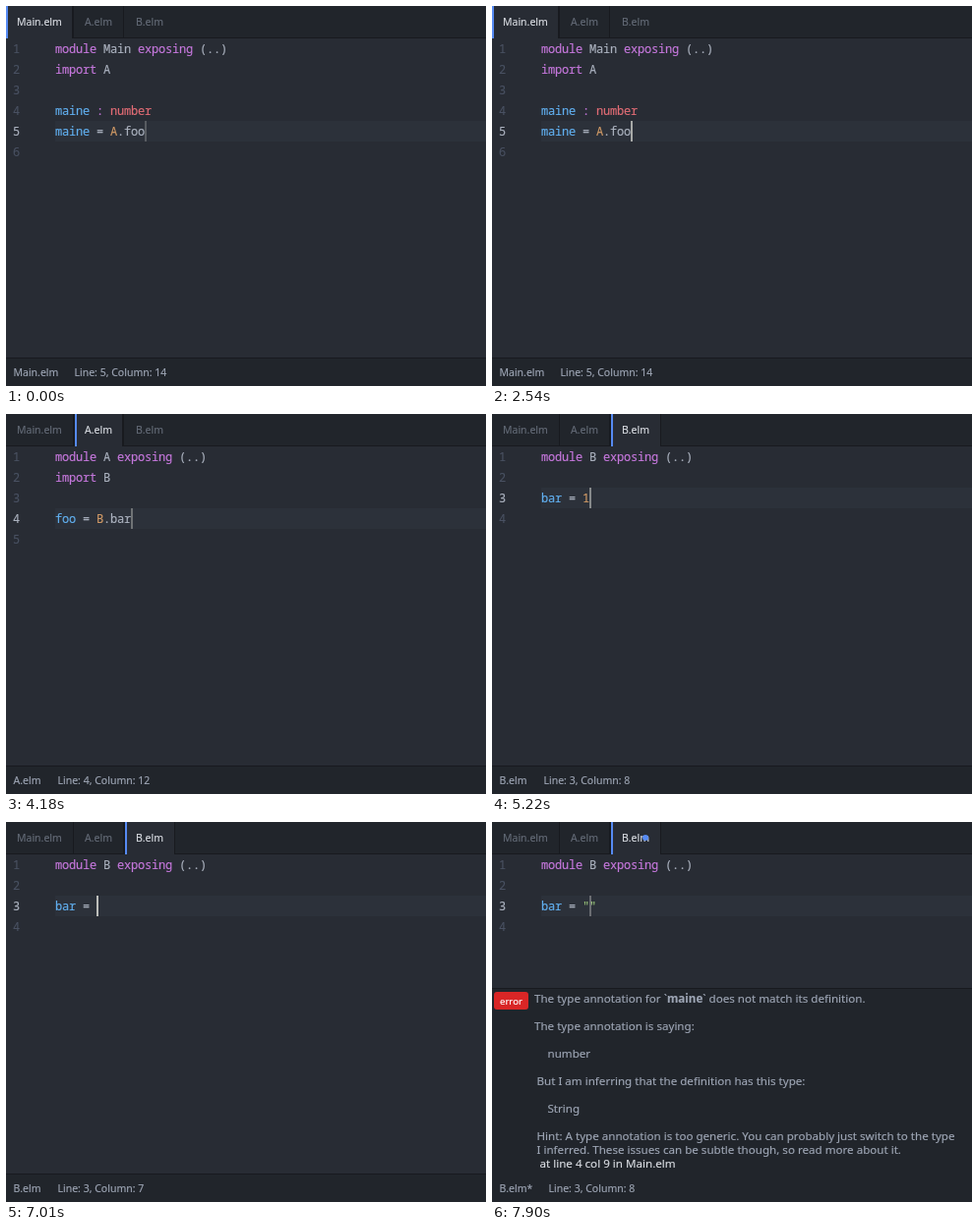
An HTML page that plays this animation: 488x387 px, repeating every 8000 ms.

```html
<!DOCTYPE html>
<html lang="en">
<head>
<meta charset="utf-8">
<title>Editor</title>
<style>
  html, body { margin: 0; width: 100%; height: 100%; overflow: hidden; background: #282c34; }
  svg { display: block; width: 488px; height: 387px; }
  text {
    white-space: pre; fill: currentColor; stroke: currentColor; stroke-width: .15px;
    font: 10.5px "Noto Sans", "Open Sans", sans-serif;
  }
  .code { font: 12px "Noto Sans Mono", "DejaVu Sans Mono", monospace; letter-spacing: -.2px; }
  .report { font-size: 11.6px; }
  .badge { font-size: 9.6px; }
</style>
</head>
<body>
<svg id="stage" viewBox="0 0 488 387"></svg>
<script>
const LOOP = 8000, SAMPLE = 149.4, BLINK = 800;
const ROW = 21, TOP = 33, LEFT = 50, CHAR = 7;
const EDGE = '#181a1f', BAR = '#21252b', PAGE = '#282c34', BLUE = '#568af2';
const SOFT = '#9da5b4', BRIGHT = '#d7dae0', FAINT = '#636a76';
const INK = { p: '#abb2bf', k: '#c678dd', b: '#61afef', r: '#e06c75', o: '#d19a66', s: '#98c379' };

const TABS = [
  { name: 'Main.elm', x: 0, end: 67, textX: 11 },
  { name: 'A.elm', x: 70, end: 118, textX: 80 },
  { name: 'B.elm', x: 121, end: 171, textX: 132 }
];

// Each token is an ink letter, a colon and the text.
const header = name => ['k:module', `p: ${name} `, 'k:exposing', 'p: (..)'];
const imports = name => ['k:import', `p: ${name}`];
const mainCode = [header('Main'), imports('A'), [],
  ['b:maine', 'p: ', 'k::', 'p: ', 'r:number'],
  ['b:maine', 'p: = ', 'o:A', 'p:.foo'], []];
const aCode = [header('A'), imports('B'), [], ['b:foo', 'p: = ', 'o:B', 'p:.bar'], []];
const bCode = value => [header('B'), [], ['b:bar', 'p: = ', ...value], []];

// peak: a moment of full cursor brightness; hold: stay bright until then.
const SCENES = [
  { at: 0, tab: 0, code: mainCode, line: 5, col: 14, peak: 325, lineX: 69.5 },
  { at: 3740, tab: 1, code: aCode, line: 4, col: 12, peak: 3905, lineX: 52.5 },
  { at: 4930, tab: 2, code: bCode(['o:1']), line: 3, col: 8, peak: 4985, lineX: 52.5 },
  { at: 6560, tab: 2, code: bCode([]), line: 3, col: 7, peak: 6860, hold: true, lineX: 52.5 },
  { at: 7305, tab: 2, code: bCode(['s:""']), line: 3, col: 8, peak: 7610, hold: true, lineX: 52.5 }
];
const STAR_AT = 7450, DOT_AT = 7600, REPORT_AT = 7750;

const REPORT = [
  [43, 184, 'The type annotation for `<tspan font-weight="700">maine</tspan>` does not match its definition.'],
  [43, 212, 'The type annotation is saying:'],
  [56.5, 240, 'number'],
  [45.5, 268, 'But I am inferring that the definition has this type:'],
  [56.5, 296, 'String'],
  [45.5, 324, 'Hint: A type annotation is too generic. You can probably just switch to the type'],
  [45.5, 338, 'I inferred. These issues can be subtle though, so read more about it.'],
  [48.5, 352, 'at line 4 col 9 in Main.elm', BRIGHT]
];

const rect = (x, y, w, h, fill, more = '') =>
  `<rect x="${x}" y="${y}" width="${w}" height="${h}" fill="${fill}" ${more}/>`;
const text = (x, y, body, color = SOFT, kind = '') =>
  `<text x="${x}" y="${y}" color="${color}" class="${kind}">${body}</text>`;

function drawTabs(active, dirty) {
  let out = rect(0, 0, 488, TOP, BAR) + rect(0, 32, 488, 1, EDGE);
  for (const x of [68, 119]) out += rect(x, 0, 1, TOP, EDGE);
  TABS.forEach((tab, i) => {
    const on = i === active;
    if (on) {
      out += rect(tab.x - 1, 0, tab.end - tab.x + 2, TOP, EDGE)
        + rect(tab.x, 0, tab.end - tab.x, TOP, PAGE) + rect(tab.x, 0, 2, TOP, BLUE);
    }
    out += text(tab.textX, 20, tab.name, on ? BRIGHT : FAINT);
  });
  return out + (dirty ? `<circle cx="156" cy="16" r="3" fill="${BLUE}"/>` : '');
}

function drawCode({ code, line }) {
  let out = rect(LEFT, TOP + (line - 1) * ROW, 488 - LEFT, ROW, '#2c313a');
  code.forEach((tokens, i) => {
    const y = TOP + i * ROW + 15;
    out += text(7, y, i + 1, i + 1 === line ? INK.p : '#495162', 'code');
    let column = 0;
    for (const token of tokens) {
      const body = token.slice(2), lead = body.length - body.trimStart().length;
      out += text(LEFT + (column + lead) * CHAR, y, body.trim(), INK[token[0]], 'code');
      column += body.length;
    }
  });
  return out;
}

function drawReport() {
  return rect(0, 169, 488, 190, BAR) + rect(0, 169, 488, 1, EDGE)
    + rect(2, 173, 35, 18, '#d92626', 'rx="3"') + text(8, 185.5, 'error', '#fff', 'badge')
    + REPORT.map(([x, y, body, color]) => text(x, y, body, color, 'report')).join('');
}

function drawStatus({ tab, line, col, lineX }, starred) {
  return rect(0, 358, 488, 29, BAR) + rect(0, 358, 488, 1, EDGE)
    + text(7.5, 377, TABS[tab].name + (starred ? '*' : ''))
    + text(lineX + (starred ? 5 : 0), 377, `Line: ${line}, Column: ${col}`);
}

function cursorAlpha({ at, peak, hold }, time) {
  // The small lead absorbs the rounding of sample times.
  const sampled = at + Math.floor((time - at) / SAMPLE + .07) * SAMPLE;
  if (hold && sampled < peak) return 1;
  const phase = Math.abs(sampled - peak) % BLINK;
  const level = 1 - Math.min(phase, BLINK - phase) / (BLINK / 2);
  return Math.min(1, level * 1.12);
}

const stage = document.getElementById('stage');
stage.innerHTML = '<g></g>' + rect(0, 0, 2, ROW, '#f8f8f0') + '<g></g>';
const [view, cursor, panels] = stage.children;
let shown = '';

function render(time) {
  const scene = SCENES.findLast(s => s.at <= time);
  const starred = time >= STAR_AT, dirty = time >= DOT_AT, report = time >= REPORT_AT;
  const state = [scene.at, starred, dirty, report].join();
  if (state !== shown) {
    shown = state;
    view.innerHTML = rect(0, 0, 488, 387, PAGE) + drawTabs(scene.tab, dirty) + drawCode(scene);
    panels.innerHTML = drawStatus(scene, starred) + (report ? drawReport() : '');
    cursor.setAttribute('x', LEFT + (scene.col - 1) * CHAR);
    cursor.setAttribute('y', TOP + (scene.line - 1) * ROW);
  }
  cursor.setAttribute('opacity', cursorAlpha(scene, time).toFixed(3));
}

const start = performance.now();
function tick() {
  render((performance.now() - start) % LOOP);
  requestAnimationFrame(tick);
}
render(0);
requestAnimationFrame(tick);
</script>
</body>
</html>
```
